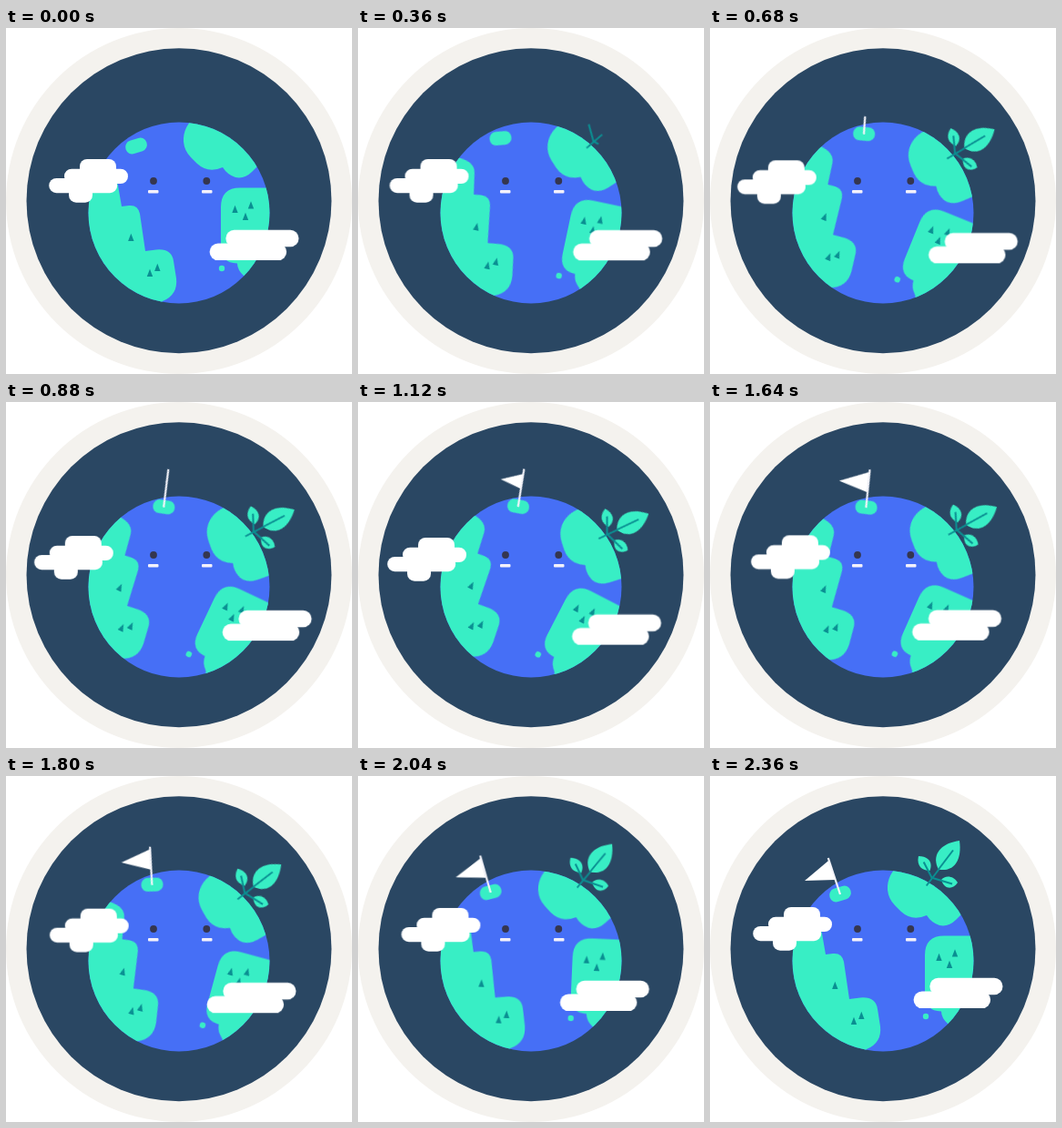
An HTML page for the animation above (2400 ms loop, 380 by 380 pixels).

```html
<!DOCTYPE html>
<html lang="en">
<head>
<meta charset="utf-8">
<title>Little planet</title>
<style>
  html, body { margin: 0; width: 100%; height: 100%; overflow: hidden; background: #fff; }
  svg { display: block; width: 100vw; height: 100vh; }
  .land { fill: #38eec5; }
  .tree { fill: #0a8f92; }
  .stem { fill: none; stroke: #0a8f92; stroke-width: 2; }
  .grow { stroke-dasharray: 1 2; }
  .white { fill: #fff; }
</style>
</head>
<body>
<svg viewBox="0 0 380 380">
  <defs>
    <clipPath id="disc"><circle cx="190" cy="203" r="99.5"/></clipPath>
    <path id="tree" class="tree" d="M0-4.3 3.2 4H-3.2Z"/>
  </defs>

  <circle cx="190" cy="190" r="190" fill="#f4f2ee"/>
  <circle cx="190" cy="189.7" r="167.5" fill="#2a4763"/>
  <circle cx="190" cy="203" r="99.5" fill="#466ff6"/>

  <g clip-path="url(#disc)">
    <g id="lands" class="land">
      <path d="M210 95Q194 108 195 125Q196 135 203 142L210 149Q222 160 238 153Q243 161 252 164Q262 166 270 158L285 143L310 120L250 70Z"/>
      <path d="M340 175.5H257Q236 175.5 236 197V240Q236 258 254 258.500Q254 266 262 273L275 310H340Z"/>
      <path d="M60 157L104 160Q121 161 123 173L127 196L135 195Q145 194 147 204L153 245L165 243.500Q182 242 184 256L187 275Q189 293 172 300L160 320H60Z"/>
      <rect x="131" y="122" width="24" height="15" rx="7.2" transform="rotate(-18 143 129.500)"/>
      <circle cx="237" cy="264" r="3.200"/>
      <use href="#tree" x="251.500" y="199"/>
      <use href="#tree" x="269" y="194.500"/>
      <use href="#tree" x="263" y="207"/>
      <use href="#tree" x="137.300" y="230"/>
      <use href="#tree" x="158" y="269"/>
      <use href="#tree" x="166.300" y="263"/>
    </g>
  </g>

  <g fill="#35364f">
    <circle cx="162" cy="168" r="3.900"/>
    <circle cx="220.300" cy="168" r="3.900"/>
  </g>
  <g fill="#f3f1fb">
    <rect x="156" y="178" width="11.500" height="3.600" rx="1"/>
    <rect x="215" y="178" width="11.500" height="3.600" rx="1"/>
  </g>

  <g id="growth">
    <g class="land">
      <path id="leafL" d="M241.500 104C231 104 227 97 229 88C240 88 245 95 241.500 104Z"/>
      <path id="leafR" d="M254 114C258 109 267 109 272 117C267 125 257 125 254 114Z"/>
      <g id="leafTop">
        <path d="M251 102.500C243 88 252 74 274 71C277 92 268 106 251 102.500Z"/>
        <path class="stem" d="M251 102.500 267 81.500"/>
      </g>
    </g>
    <path id="stem" class="stem grow" pathLength="1" d="M237.700 120.500 251.400 102.500"/>
    <path id="twigL" class="stem grow" pathLength="1" d="M244 112.500 234.700 94.500"/>
    <path id="twigR" class="stem grow" pathLength="1" d="M244.500 112 266 118.500"/>
    <path id="banner" class="white" d="M130.700 92.500 104 115 137.500 114Z"/>
    <path id="pole" class="grow" pathLength="1" fill="none" stroke="#f4f4fa" stroke-width="2.200" d="M143 130 129.800 90"/>
  </g>

  <g id="cloudL" class="white">
    <rect x="81" y="144" width="40" height="20" rx="8"/>
    <rect x="64" y="154.700" width="70" height="16.300" rx="8.100"/>
    <rect x="47.200" y="165" width="75" height="16.200" rx="8.100"/>
    <rect x="69" y="172" width="26" height="19.700" rx="8"/>
  </g>
  <g id="cloudR" class="white">
    <rect x="241.300" y="221.700" width="80.200" height="18.500" rx="9.200"/>
    <rect x="223.600" y="236.500" width="84.500" height="18.600" rx="9.300"/>
  </g>
</svg>
<script>
const LOOP = 2400;
const $ = id => document.getElementById(id);

// Steps are [ms, value, easing to the next step].
function play(id, prop, steps) {
  const frames = steps.map(([ms, v, easing = 'linear']) =>
    ({ offset: ms / LOOP, [prop]: v, easing }));
  const last = steps[steps.length - 1];
  if (last[0] < LOOP) frames.push({ offset: 1, [prop]: last[1] });
  $(id).animate(frames, { duration: LOOP, iterations: Infinity });
}

const draw = (id, from, to, easing) =>
  play(id, 'strokeDashoffset', [[0, 1], [from, 1, easing], [to, 0]]);

function pop(id, x, y, from, to, easing) {
  $(id).style.transformOrigin = `${x}px ${y}px`;
  play(id, 'transform', [[0, 'scale(0)'], [from, 'scale(0)', easing], [to, 'scale(1)']]);
}

const drift = (id, points) =>
  play(id, 'transform', points.map(([ms, x, y]) => [ms, `translate(${x}px, ${y}px)`]));

for (const id of ['lands', 'growth']) {
  $(id).style.transformOrigin = '190px 190px';
  play(id, 'transform', [
    [0, 'rotate(0deg)', 'ease'],
    [1400, 'rotate(28deg)'],
    [1440, 'rotate(28deg)', 'ease-in-out'],
    [2200, 'rotate(0deg)']
  ]);
}

draw('stem', 120, 340, 'ease-out');
draw('twigL', 200, 360, 'ease-out');
draw('twigR', 300, 560);
pop('leafTop', 251, 102.5, 360, 640, 'ease-out');
pop('leafL', 241.5, 104, 370, 640, 'ease-out');
pop('leafR', 254, 114, 400, 680, 'ease-out');
draw('pole', 560, 820);
pop('banner', 134, 103, 860, 1220);

drift('cloudL', [[0, 0, 0], [520, -18, 0], [1120, -15, 5], [1760, 0.8, 1.8], [2360, 0, 0]]);
drift('cloudR', [[0, 0, 0], [520, 18.2, 0.3], [1120, 11.5, 11.6], [1720, -3.4, 6], [2360, 0, 0]]);
</script>
</body>
</html>
```
